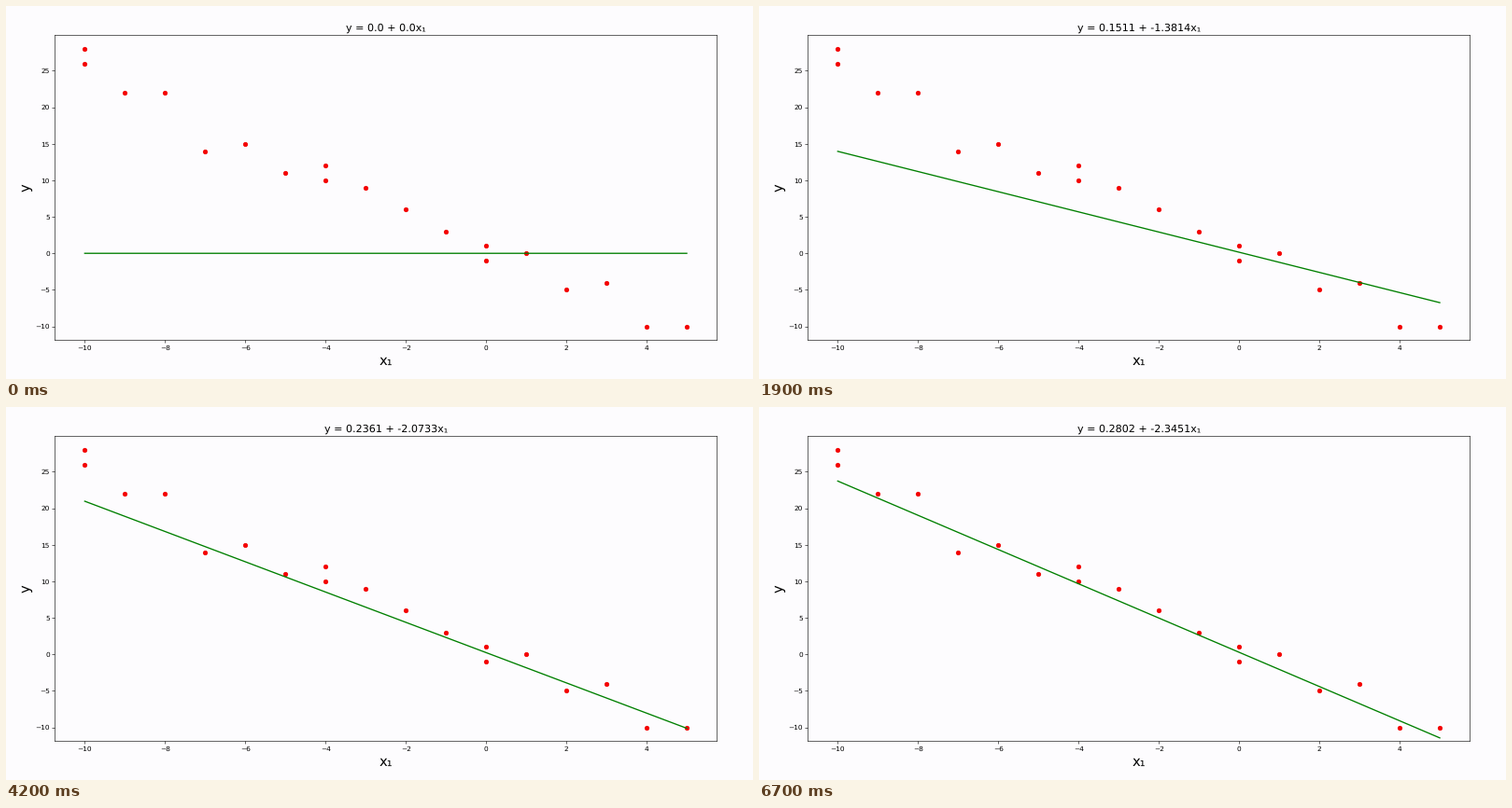
Write a matplotlib script that moves like this. It is 800 by 400 pixels and loops after 6800 ms.

```python
import numpy as np
import matplotlib.pyplot as plt
from matplotlib.animation import FuncAnimation

W, H = 800, 400
DPI = W / 15
FRAMES, STEP_MS = 68, 100
RATE = 0.00141
PAPER = "#fdfcfe"

plt.rcParams.update({
    "font.family": "DejaVu Sans",
    "text.hinting": "none",
    "figure.facecolor": PAPER,
    "axes.facecolor": PAPER,
})

# One sample per integer x, with a second one at -10, -4 and 0.
xs = np.array(sorted([*range(-10, 6), -10, -4, 0]))
ys = np.array([28, 26, 22, 22, 14, 15, 11, 12, 10, 9,
               6, 3, 1, -1, 0, -5, -4, -10, -10])


def fit(steps):
    """Intercept and slope after some steps of gradient descent from zero."""
    b = w = 0.0
    for _ in range(steps):
        err = ys - (b + w * xs)
        b, w = b + RATE * err.mean(), w + RATE * (err * xs).mean()
    return round(float(b), 4), round(float(w), 4)


fig = plt.figure(figsize=(W / DPI, H / DPI), dpi=DPI)
left, right, top, bottom = 52.1, 761.3, 31.1, 358.4
ax = fig.add_axes([left / W, 1 - bottom / H,
                   (right - left) / W, (bottom - top) / H])
ax.set_xlim(-10.75, 5.75)
ax.set_ylim(-11.9, 29.9)
ax.set_xlabel("x₁", fontsize=20)
ax.set_ylabel("y", fontsize=20)
title = ax.set_title("", fontsize=15)

ax.scatter(xs, ys, color="#f40000", snap=False)
ends = np.array([-10, 5])
line, = ax.plot(ends, 0 * ends, color="green", lw=1.8, snap=False)


def update(step):
    b, w = fit(step)
    line.set_ydata(b + w * ends)
    title.set_text(f"y = {b} + {w}x₁")
    return line, title


anim = FuncAnimation(fig, update, frames=FRAMES, interval=STEP_MS,
                     repeat=True, repeat_delay=0, blit=False)
plt.show()
```
